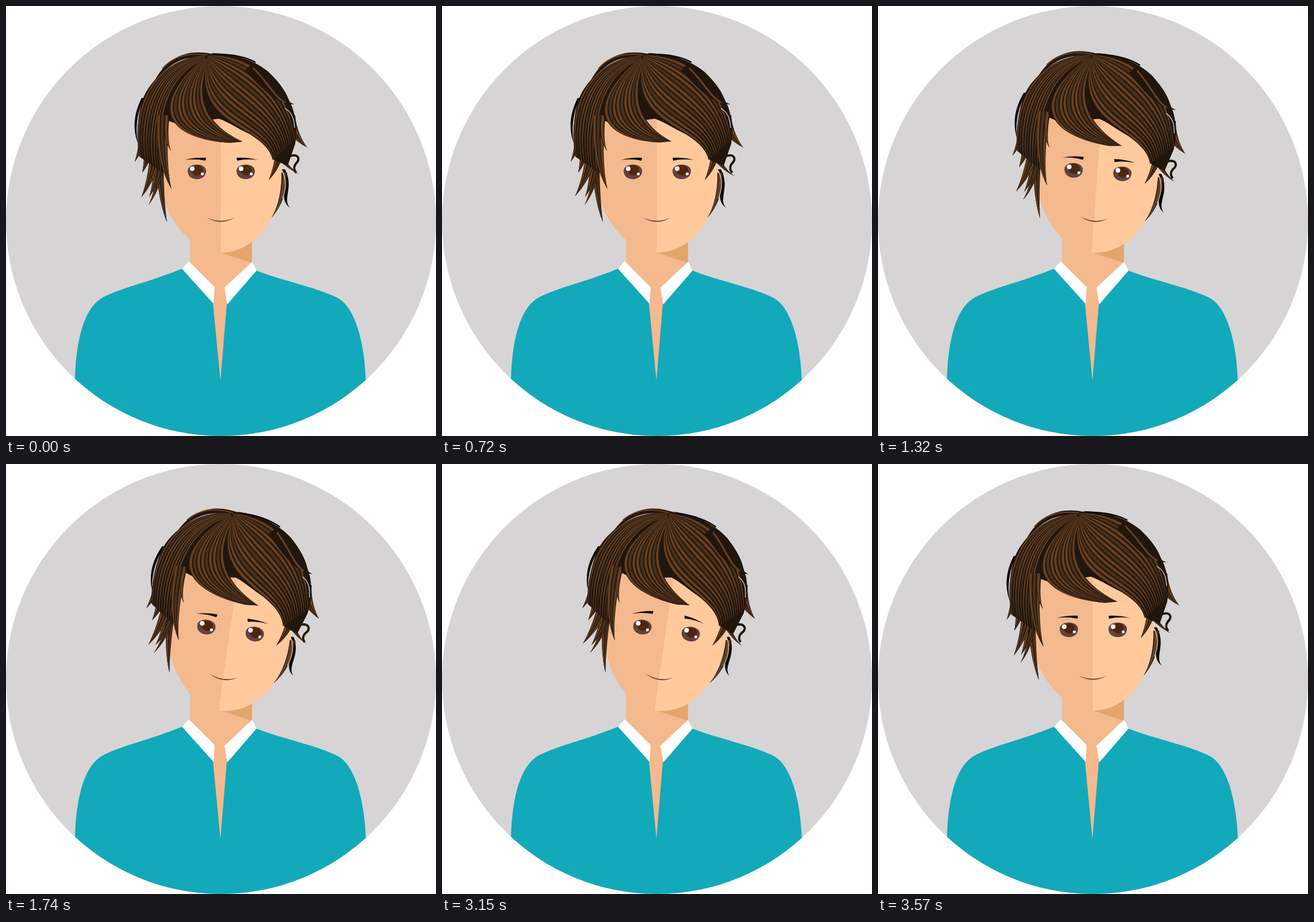
These frames come from a looping animation (748 by 748 pixels, 3600 ms). An HTML page with a canvas:

```html
<!DOCTYPE html>
<html lang="en">
<head>
<meta charset="utf-8">
<title>Portrait</title>
<style>
html, body { margin: 0; width: 100%; height: 100%; overflow: hidden; background: #fff; }
canvas { display: block; width: 748px; height: 748px; }
</style>
</head>
<body>
<canvas id="stage" width="748" height="748"></canvas>
<script>
const ctx = document.getElementById('stage').getContext('2d');
const LOOP = 3600, SWAY = 2000, TILT = 8.2 * Math.PI / 180;
const SKIN = '#f4b98d', LIGHT = '#ffc99c', DARK = '#21160d', BROWN = '#694122', MID = '#4a301b';
const INK = '#0d0907', GREY = '#d6d4d5';

const mix = (a, b, k) => a + (b - a) * k;
const wave = (t, peak) => Math.cos((t - peak) / SWAY * 2 * Math.PI);
const ramp = (t, from, to) => {
  const k = Math.min(1, Math.max(0, (t - from) / (to - from)));
  return k * k * (3 - 2 * k);
};

function fill(color, d) {
  ctx.fillStyle = color;
  ctx.fill(new Path2D(d));
}

function line(color, width, d) {
  ctx.strokeStyle = color;
  ctx.lineWidth = width;
  ctx.stroke(new Path2D(d));
}

function dot(color, x, y, rx, ry = rx) {
  ctx.fillStyle = color;
  ctx.beginPath();
  ctx.ellipse(x, y, rx, ry, 0, 0, 7);
  ctx.fill();
}

// Area between two cubic curves
function ribbon(color, a, b) {
  ctx.fillStyle = color;
  ctx.beginPath();
  ctx.moveTo(a[0], a[1]);
  ctx.bezierCurveTo(...a.slice(2));
  ctx.lineTo(b[6], b[7]);
  ctx.bezierCurveTo(b[4], b[5], b[2], b[3], b[0], b[1]);
  ctx.fill();
}

// Dark area of hair between two curves, with n tapered highlights
function strands(n, a, b) {
  const at = (k, tip) => a.map((v, i) => mix(v, b[i], (i < 6 ? k : tip) / n));
  ribbon(DARK, a, b);
  for (let k = 0; k < n; k++) {
    ribbon(MID, at(k + .08, k + .4), at(k + .82, k + .6));
    if (k % 3 != 1) ribbon(BROWN, at(k + .25, k + .45), at(k + .7, k + .55));
  }
}

// Pointed lock from a base of the given width to a tip, bowed sideways
function lock(x, y, tipX, tipY, width, bow, n = 2) {
  const edge = side => [
    x + side * width / 2, y,
    x + side * width / 2 + bow, mix(y, tipY, .45),
    mix(x, tipX, .5) + side * width / 4 + bow, mix(y, tipY, .8),
    tipX, tipY
  ];
  strands(n, edge(-1), edge(1));
}

function body() {
  ctx.save();
  ctx.beginPath();
  ctx.arc(374, 374, 374, 0, 7);
  ctx.clip();
  fill(GREY, 'M0 0H748V748H0Z');
  fill('#12a9bb', 'M306 457C250 480 204 489 170 506C138 522 122 575 120 649V748H626V651C624 590 609 525 577 508C540 489 480 478 435 460Z');
  ctx.restore();
  fill(SKIN, 'M320 380H428V447L384 519L373 652L360 517L320 447Z');
  fill('#e4a56d', 'M374 429L428 403V447Z');
  fill('#fff', 'M318 444L306 457L361 518L363 489Z');
  fill('#fff', 'M428 445L436 460L385 519L380 490Z');
}

function eye(x) {
  fill('#604240', `M${x - 16} 287C${x - 16} 272 ${x + 16} 272 ${x + 16} 287C${x + 16} 306 ${x - 16} 306 ${x - 16} 287Z`);
  dot('#4d260c', x + 1, 286, 10, 9);
  dot('#fff', x - 8, 283, 4);
  dot('#fff', x + 9.5, 292, 2.5);
}

function brow(side, lift) {
  ctx.save();
  ctx.translate(374.5 + side * 63.5, 268);
  ctx.scale(side, 1);
  ctx.rotate(lift * .16);
  fill(INK, 'M0 0Q-17 -5 -37 -4L-36 1Q-17 -3 0 0Z');
  ctx.restore();
}

function face(lift) {
  fill(LIGHT, 'M373 429C425 429 462 385 471 345C477 320 481 305 481 288L470 220L455 150H373Z');
  fill(SKIN, 'M373.5 429C350 428 330 418 318 405C290 378 270 345 267 290L272 220L290 150H373.5Z');
  for (const x of [332, 417]) eye(x);
  for (const side of [-1, 1]) brow(side, lift);
  fill('#65483f', 'M349 368Q374 383 398 368Q374 379 349 368Z');
}

function sideLocks(t) {
  const swing = 2.5 * wave(t, 1700);
  const curl = 2.5 - 2.5 * wave(t, 0);
  // Left
  lock(268, 270, 280, 376, 12, 0);
  lock(268, 240, 248, 346, 13, 4);
  lock(268, 230, 249, 332, 20, 2);
  lock(264, 210, 234 + swing, 332 + swing / 2, 24, 1, 3);
  lock(251, 200, 237, 290, 22, 2);
  lock(246, 170, 224, 271, 20, 0);
  fill(INK, 'M236 160C221 190 221 215 229 238C226 215 226 190 240 160Z');
  // Right
  fill(INK, 'M480 284C494 310 472 335 494 351C480 335 502 315 485 284Z');
  lock(484, 290, 462, 368, 10, 1, 1);
  line(GREY, 1.2, 'M482 289C488 305 487 318 481 335');
  line(DARK, 4, 'M492 262C505 256 512 263 507 271C500 278 500 285 505 290');
  lock(471, 236, 509, 292 + curl, 15, -1);
  lock(477, 245, 457, 303, 14, -2);
  lock(490, 190, 524, 246, 26, 2, 3);
}

function crown() {
  fill(DARK, 'M340 86L361 82C400 84 430 93 456 114C476 133 486 148 491 161L498 176C506 200 506 220 503 240L490 278L466 268C462 245 440 230 425 223C400 212 390 203 370 196L300 206L283 200C277 230 278 260 276 290L245 270L229 235C229 185 235 160 250 140C270 112 300 92 340 86Z');
  fill(DARK, 'M362 84C325 76 285 80 258 131C292 90 320 85 362 91Z');
  line(BROWN, 2, 'M350 85C320 81 292 86 272 109');
  // Left side
  strands(9, [346, 86, 262, 92, 216, 165, 232, 262], [348, 92, 275, 120, 262, 210, 272, 290]);
  lock(273, 190, 288, 318, 20, -4, 3);
  lock(280, 195, 287, 252, 8, -3, 1);
  // Right side
  strands(13, [350, 86, 440, 82, 492, 150, 504, 232], [350, 92, 322, 215, 450, 205, 464, 268]);
  fill(DARK, 'M430 98C462 126 478 164 502 171C475 173 450 150 416 112Z');
  line(BROWN, 3, 'M430 108C454 130 466 158 486 168');
  line(GREY, 1.3, 'M485 178C496 184 501 194 502 212');
  line(INK, 2.5, 'M362 84C395 83 420 90 434 98');
}

function fringe(t) {
  const dx = 9 * wave(t, 1640), dy = 3 * wave(t, 1400);
  const bend = ([x, y, ...rest]) => [...rest, x + dx, y + dy];
  strands(9,
    bend([386, 239, 342, 92, 240, 180, 285 + dx * .4, 232]),
    bend([408, 237, 353, 92, 325, 170, 355 + dx * .4, 210]));
}

function draw(t) {
  const back = ramp(t, 3255, 3555);
  ctx.clearRect(0, 0, 748, 748);
  body();
  ctx.save();
  ctx.translate(373.5, 401);
  ctx.rotate(TILT * (ramp(t, 1170, 1470) - back));
  ctx.translate(-373.5, -401);
  face(ramp(t, 1800, 2100) - back);
  sideLocks(t);
  crown();
  fringe(t);
  ctx.restore();
}

function tick() {
  draw(performance.now() % LOOP);
  requestAnimationFrame(tick);
}
tick();
</script>
</body>
</html>
```
